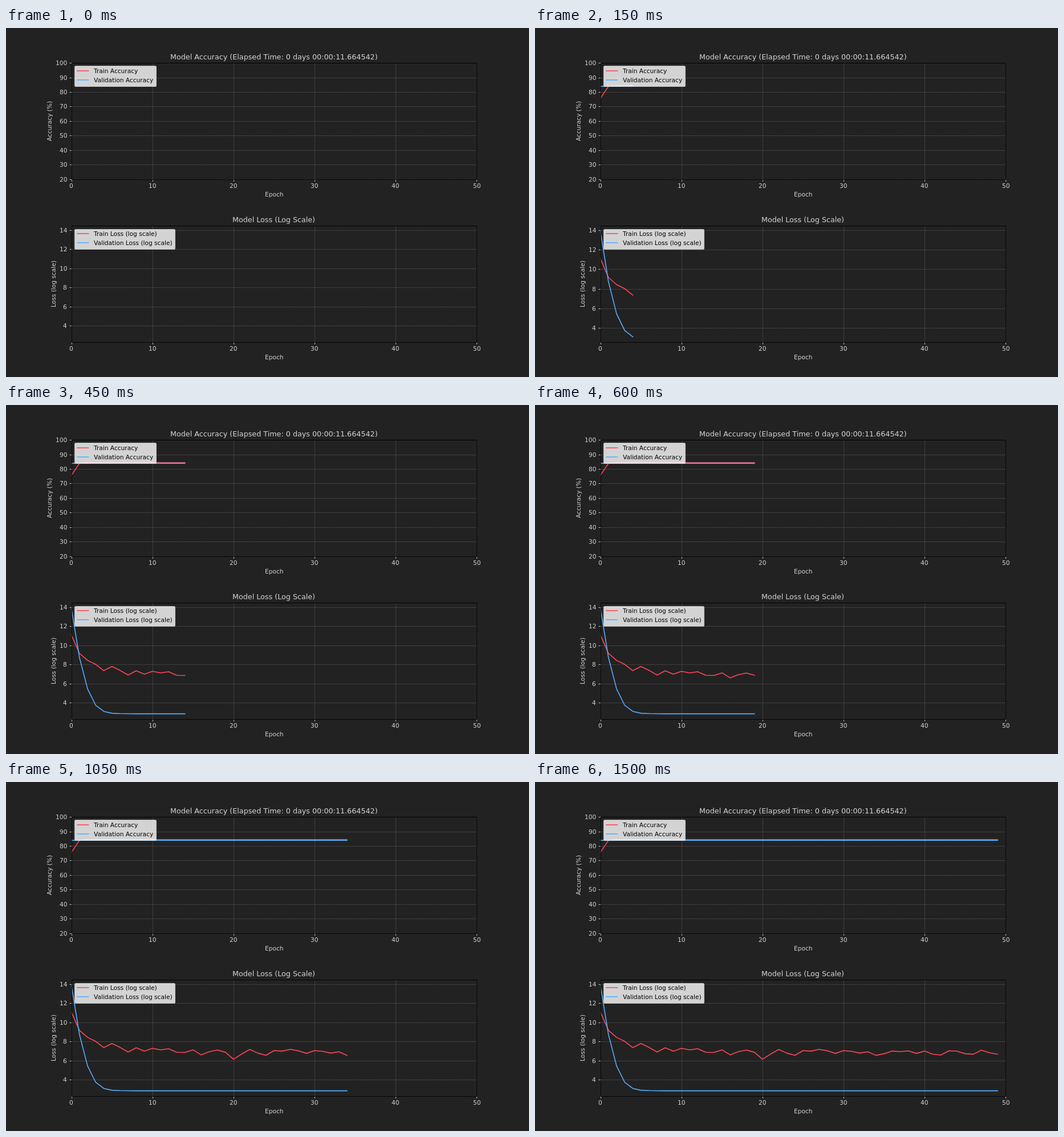
An HTML page with a canvas for the animation above (6450 ms loop, 917 by 611 pixels).

```html
<!DOCTYPE html>
<html lang="en">
<head>
<meta charset="utf-8">
<title>Training curves</title>
<style>
  html, body { margin: 0; height: 100%; overflow: hidden; background: #222; }
  canvas { display: block; }
</style>
</head>
<body>
<canvas id="stage" width="917" height="611"></canvas>
<script>
const ctx = document.getElementById('stage').getContext('2d');
const LOOP = 6450, STEP = 30, EPOCHS = 50;
const PT = 917 / 864;               // pixels per typographic point
const LEFT = 114.625, WIDTH = 710.675, HEIGHT = 203.67;
const LIGHT = '#d3d3d3', RED = '#ff4757', BLUE = '#55aeff';
const FAMILY = 'px "DejaVu Sans", sans-serif';

const series = f => Array.from({ length: EPOCHS }, (_, i) => f(i));
const trainAcc = series(i => [75.6, 83.9][i] ?? 84.4);
const valAcc = series(() => 83.9);
const trainLoss = [
  11.09, 9.16, 8.43, 8.02, 7.36, 7.80, 7.39, 6.90, 7.35, 6.99,
  7.29, 7.13, 7.25, 6.87, 6.86, 7.13, 6.61, 6.93, 7.11, 6.88,
  6.15, 6.69, 7.17, 6.79, 6.56, 7.05, 7.00, 7.19, 7.03, 6.76,
  7.05, 6.98, 6.79, 6.93, 6.55, 6.73, 7.00, 6.95, 7.02, 6.76,
  7.00, 6.68, 6.59, 7.04, 6.99, 6.73, 6.67, 7.10, 6.83, 6.67];
const valLoss = series(i => [13.9, 8.72, 5.45, 3.74, 3.1, 2.91, 2.87, 2.86][i] ?? 2.85);

const snap = v => Math.floor(v + 0.5) + 0.5;
const xAt = epoch => LEFT + epoch * WIDTH / 50;

// Text starts on a whole pixel; align is 0 (left), 0.5 (centre) or 1 (right)
function text(str, x, y, align = 0.5, color = LIGHT, size = 10) {
  ctx.font = size * PT + FAMILY;
  ctx.fillStyle = color;
  const m = ctx.measureText(str);
  const bearing = Math.max(0, -m.actualBoundingBoxLeft);
  const left = Math.round(x - m.width * align + bearing) - Math.floor(bearing);
  ctx.fillText(str, left, Math.round(y));
}

function stroke(points, color, width, dash = []) {
  ctx.strokeStyle = color;
  ctx.lineWidth = width * PT;
  ctx.setLineDash(dash.map(d => d * PT));
  ctx.beginPath();
  points.forEach(([x, y], i) => i ? ctx.lineTo(x, y) : ctx.moveTo(x, y));
  ctx.stroke();
}

const grid = points => stroke(points, '#707070', 0.5, [1.85, 0.8]);
const tick = points => stroke(points, LIGHT, 0.8);

function legend(top, right, names) {
  const x = snap(LEFT + 5.3), y = snap(top + 5.3);
  ctx.beginPath();
  ctx.roundRect(x, y, snap(right) - x, snap(top + 41.1) - y, 2.1);
  ctx.fillStyle = 'rgba(255,255,255,0.8)';
  ctx.fill();
  ctx.setLineDash([]);
  ctx.lineWidth = PT;
  ctx.strokeStyle = 'rgba(204,204,204,0.8)';
  ctx.stroke();
  names.forEach((name, i) => {
    const base = Math.floor(top) + 18 + 16 * i;
    stroke([[124.2, base - 4], [145.4, base - 4]], [RED, BLUE][i], 1.5);
    text(name, 153.9, base, 0, '#000');
  });
}

function chart(o, n) {
  const { top, lo, hi, step } = o;
  const bottom = top + HEIGHT, middle = LEFT + WIDTH / 2;
  const yAt = v => bottom - (v - lo) / (hi - lo) * HEIGHT;
  const x0 = snap(LEFT), x1 = snap(LEFT + WIDTH), y0 = snap(top), y1 = snap(bottom);

  for (let e = 0; e <= 50; e += 10) {
    const x = snap(xAt(e));
    grid([[x, y1], [x, y0]]);
    tick([[x, y1], [x, y1 + 3.5]]);
    text(e, xAt(e), bottom + 15.5);
  }
  for (let v = Math.ceil(lo / step) * step; v <= hi; v += step) {
    const y = snap(yAt(v));
    grid([[x0, y], [x1, y]]);
    tick([[x0 - 4, y], [x0, y]]);
    text(v.toFixed(step < 1 ? 1 : 0), 107.2, yAt(v) + 4, 1);
  }

  ctx.lineJoin = 'round';
  ctx.lineCap = 'square';
  ctx.save();
  ctx.beginPath();
  ctx.rect(LEFT, top, WIDTH, HEIGHT);
  ctx.clip();
  o.data.forEach((values, i) =>
    stroke(values.slice(0, n).map((v, e) => [xAt(e), yAt(v)]), [RED, BLUE][i], 1.5));
  ctx.restore();
  ctx.lineCap = 'butt';

  stroke([[x0, y0], [x1, y0], [x1, y1], [x0, y1], [x0, y0], [x1, y0]], '#000', 0.8);
  text(o.title, middle, top - 6.37, 0.5, LIGHT, 12);
  text('Epoch', middle, bottom + 30);
  ctx.save();
  ctx.translate(o.labelX, Math.round(top + HEIGHT / 2));
  ctx.rotate(-Math.PI / 2);
  text(o.label, 0, 0);
  ctx.restore();
  legend(top, o.legendRight, o.names);
}

// Loss axis: fits the visible points with a 5% margin
function lossScale(n) {
  const shown = [...trainLoss.slice(0, n), ...valLoss.slice(0, n)];
  const min = Math.min(...shown), max = Math.max(...shown);
  const pad = (max - min) * 0.05;
  const lo = min - pad, hi = max + pad;
  const step = [0.5, 1, 2].find(s => s >= (hi - lo) / 9);
  return { lo, hi, step, labelX: step < 1 ? 77 : 87 };
}

function draw(t) {
  const n = Math.min(EPOCHS, Math.floor(t % LOOP / STEP));
  ctx.fillStyle = '#222';
  ctx.fillRect(0, 0, 917, 611);
  chart({
    top: 61.1, lo: 20, hi: 100, step: 10, labelX: 80,
    title: 'Model Accuracy (Elapsed Time: 0 days 00:00:11.664542)',
    label: 'Accuracy (%)', data: [trainAcc, valAcc],
    names: ['Train Accuracy', 'Validation Accuracy'], legendRight: 263.35
  }, n);
  chart({
    top: 346.23, ...lossScale(n || EPOCHS),
    title: 'Model Loss (Log Scale)',
    label: 'Loss (log scale)', data: [trainLoss, valLoss],
    names: ['Train Loss (log scale)', 'Validation Loss (log scale)'], legendRight: 296.4
  }, n);
}

const start = performance.now();
function loop() {
  draw(performance.now() - start);
  requestAnimationFrame(loop);
}
loop();
</script>
</body>
</html>
```
